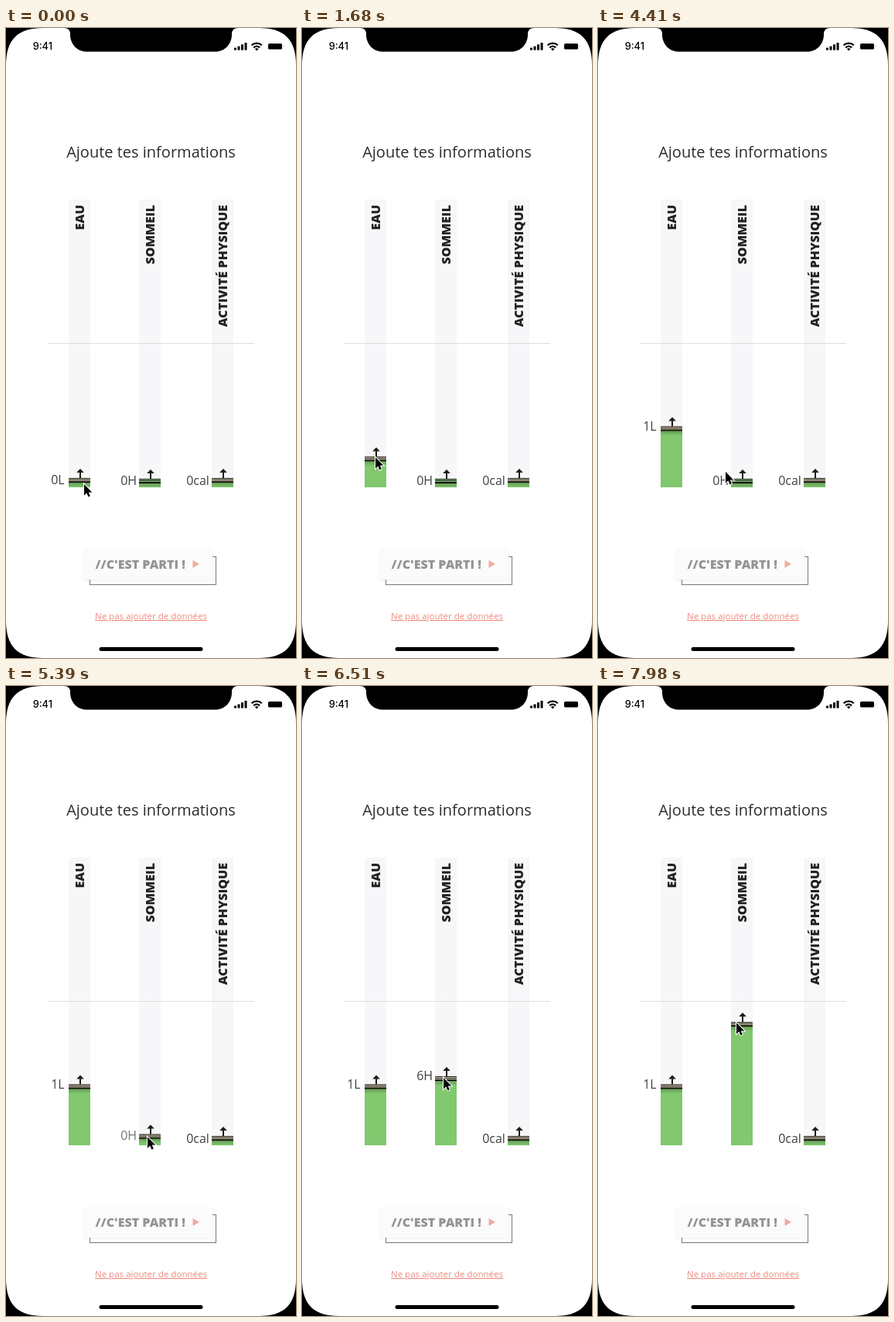
These frames come from a looping animation (375x812 px, 8 s). An HTML page:

```html
<!DOCTYPE html>
<html lang="fr">
<head>
<meta charset="utf-8">
<style>
html, body { margin: 0; width: 100%; height: 100%; overflow: hidden; background: #000; }
svg { display: block; font-family: "Open Sans", sans-serif; }
.bold { font-weight: 800; font-size: 16px; }
</style>
</head>
<body>
<svg id="stage" width="375" height="812" viewBox="0 0 375 812">
  <defs>
    <linearGradient id="shade" x2="0" y2="1">
      <stop stop-color="#000" stop-opacity=".26"/>
      <stop offset="1" stop-color="#000" stop-opacity="0"/>
    </linearGradient>
    <filter id="soft" x="-10%" y="-20%" width="120%" height="150%">
      <feDropShadow dx="0" dy="1" stdDeviation="1.5" flood-opacity=".07"/>
    </filter>
  </defs>
  <path d="M0 48C0 15 15 0 48 0H327C360 0 375 15 375 48V764C375 797 360 812 327 812H48C15 812 0 797 0 764Z" fill="#fff"/>
  <path d="M75 0Q83 0 83 8C83 21 92 30.5 104.5 30.5H270.5C283 30.5 292 21 292 8Q292 0 300 0Z"/>

  <!-- status bar -->
  <text x="47.3" y="28" text-anchor="middle" font-size="12.8" font-weight="500" style="font-family:Inter,sans-serif">9:41</text>
  <path d="M296.5 28.5v-3M301 28.5v-5M305.5 28.5v-7.2M310 28.5v-9.5" stroke="#000" stroke-width="3"/>
  <path d="M317.6 22.3a9.5 9.5 0 0 1 13.2 0M320.2 25.2a5.8 5.8 0 0 1 8 0" fill="none" stroke="#000" stroke-width="2.2"/>
  <path d="M324.2 29.5l-2.3-2.4a3.4 3.4 0 0 1 4.6 0z"/>
  <rect x="339" y="20" width="18" height="7.5" rx="1.6"/>
  <path d="M359 22q1.5 1.7 0 3.6z" fill-opacity=".4"/>

  <text x="187.5" y="167" text-anchor="middle" font-size="20" fill="#2b2b2b">Ajoute tes informations</text>
  <g id="sliders"></g>

  <!-- button and link -->
  <rect x="108.5" y="681.5" width="163" height="36" fill="none" stroke="#777"/>
  <rect x="101" y="672" width="166" height="39" fill="#fbfbfb" filter="url(#soft)"/>
  <text class="bold" x="115.5" y="696.7" fill="#949494">//C'EST PARTI !</text>
  <path d="M241.5 686l8.5 5l-8.5 5z" fill="#f0aca0"/>
  <text x="187.5" y="762" text-anchor="middle" font-size="11.55" fill="#ee8a7e" text-decoration="underline">Ne pas ajouter de données</text>
  <rect x="120.5" y="798" width="134" height="5" rx="2.5"/>
  <path id="cursor" d="M0 0V14.4L3.3 11.3L5.4 16.2L7.8 15.2L5.8 10.4H10.3Z" stroke="#fff" paint-order="stroke" stroke-width="2"/>
</svg>
<script>
const LOOP = 8000, STEP = 70, BOTTOM = 592;
const inOut = p => (1 - Math.cos(Math.PI * p)) / 2;
const easeIn = p => p * p;
const easeOut = p => 1 - (1 - p) ** 2;

// Keys are [time, value, easing]; easing shapes the way into its key.
function at(keys, t) {
  const i = keys.findIndex(k => k[0] > t);
  if (i < 0) return keys[keys.length - 1][1];
  if (i === 0) return keys[0][1];
  const [t0, a] = keys[i - 1], [t1, b, ease = p => p] = keys[i];
  return a + (b - a) * ease((t - t0) / (t1 - t0));
}

// top: arrow tip at rest; drop: arrow tip to label baseline
const sliders = [
  { x: 81, name: "EAU", top: 568, drop: 19.8, labelX: 58.2,
    rise: [[910, 0], [2630, 66, inOut], [3570, 66], [3640, 66.6]],
    labels: [["0L", [[910, 1], [1680, 0]]], ["1L", [[2030, 0], [2730, 1]]]] },
  { x: 172, name: "SOMMEIL", top: 569, drop: 19.8, labelX: 148.2,
    rise: [[5180, 0], [5950, 46, easeIn], [6020, 59], [6510, 78, easeOut],
           [6930, 78], [7420, 118, inOut], [7770, 136], [7980, 148]],
    labels: [["0H", [[5180, 1], [5950, 0]]],
             ["6H", [[5950, 0], [6510, 1], [6930, 1], [7700, 0]]]] },
  { x: 266, name: "ACTIVITÉ PHYSIQUE", top: 568, drop: 21.2, labelX: 233.2,
    rise: [[0, 0]], labels: [["0cal", [[0, 1]]]] }
];

// Pointer height is measured with the dragged slider at rest.
const pointerX = [[0, 101], [280, 93.5], [910, 93.5], [1680, 95], [2660, 97], [3990, 97], [4130, 154],
  [4340, 154], [4410, 165], [4690, 183], [6510, 183], [7420, 181], [7980, 179]];
const pointerY = [[0, 588], [280, 585], [910, 585], [1680, 581], [3920, 581], [3990, 515], [4130, 565],
  [4340, 565], [4410, 572], [4690, 586], [5180, 586], [5950, 581], [6510, 583], [7980, 582]];

const group = document.getElementById("sliders");
group.innerHTML = sliders.map(s => `
  <rect x="${s.x}" y="221" width="28" height="371" fill="#f7f7f9"/>
  <text class="bold" transform="translate(${s.x + 20} 228) rotate(-90)" text-anchor="end" fill="#222">${s.name}</text>`).join("") +
  `<path d="M54 406.5H321" stroke="#dedede"/>` +
  sliders.map(s => `
  <g class="slider">
    <rect class="fill" x="${s.x}" width="28" fill="#81c86f"/>
    <g class="handle">
      <rect y="17" width="28" height="7" fill="url(#shade)"/>
      <rect class="gap" y="12" width="28" height="5"/>
      <path d="M0 12.5H28M0 14.5H28" stroke="#14140c"/>
      <path d="M0 17H28" stroke="#14140c" stroke-width="2"/>
      <path d="M15 0L19.8 5H16V12H14V5H10.2Z" fill="#1c1c0e"/>
    </g>
    ${s.labels.map(l => `<text class="label" x="${s.labelX}" font-size="16" fill="#404040">${l[0]}</text>`).join("")}
  </g>`).join("");

[...group.querySelectorAll(".slider")].forEach((g, i) => {
  sliders[i].fill = g.querySelector(".fill");
  sliders[i].handle = g.querySelector(".handle");
  sliders[i].gap = g.querySelector(".gap");
  sliders[i].texts = g.querySelectorAll(".label");
});
const cursor = document.getElementById("cursor");

function draw(t) {
  sliders.forEach((s, i) => {
    const rise = at(s.rise, t), y = s.top - rise;
    s.fill.setAttribute("y", y + 16);
    s.fill.setAttribute("height", BOTTOM - y - 16);
    s.handle.setAttribute("transform", `translate(${s.x} ${y})`);
    s.gap.setAttribute("fill", i === 1 && rise < 1 ? "#8fd08a" : "#e2d8c0");
    s.texts.forEach((text, n) => {
      text.setAttribute("y", y + s.drop - rise * 0.03);
      text.setAttribute("opacity", at(s.labels[n][1], t));
    });
  });
  const dragged = sliders[t < 3990 ? 0 : 1];
  cursor.setAttribute("transform", `translate(${at(pointerX, t)} ${at(pointerY, t) - at(dragged.rise, t)})`);
}

function tick() {
  const t = performance.now() % LOOP;
  draw(Math.floor(t / STEP) * STEP);
  requestAnimationFrame(tick);
}
tick();
</script>
</body>
</html>
```
